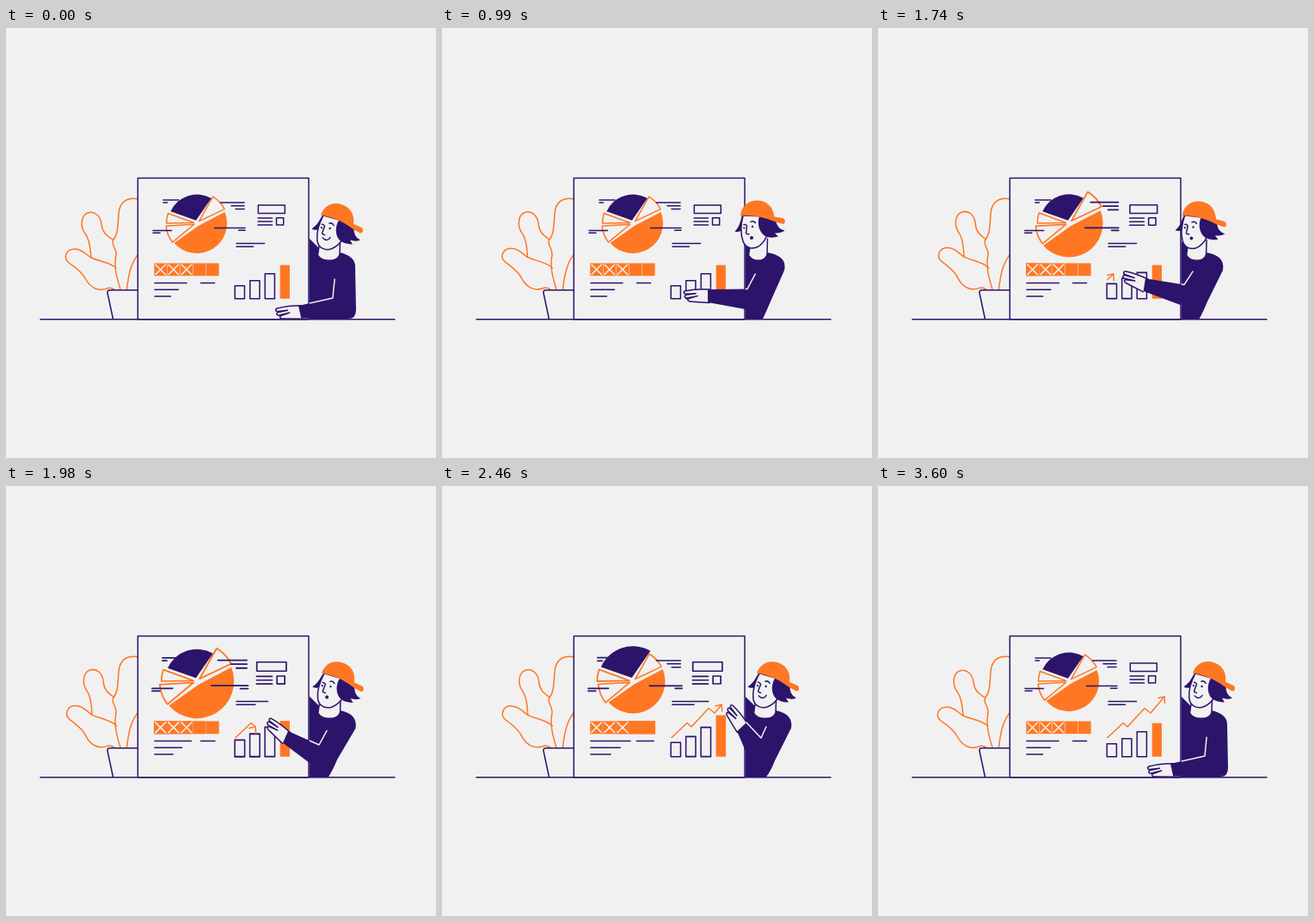
An HTML page for the animation above (3630 ms loop, 500 by 500 pixels).

```html
<!DOCTYPE html>
<html lang="en">
<head>
<meta charset="utf-8">
<title>Presentation board</title>
<style>
  html, body { margin: 0; height: 100%; overflow: hidden; background: #f1f1f1; }
  svg { display: block; width: 100%; height: 100%; stroke-linecap: round; stroke-linejoin: round; }
  .ink { fill: #2c146b; }
  .pop { fill: #ff7723; }
  .line { fill: none; stroke: #2c146b; stroke-width: 1.5; }
  .warm { fill: none; stroke: #ff7723; stroke-width: 1.5; }
  .light { fill: none; stroke: #f1f1f1; stroke-width: 1.5; }
  .skin { fill: #f1f1f1; stroke: #2c146b; stroke-width: 1.5; }
</style>
</head>
<body>
<svg viewBox="0 0 500 500">
  <clipPath id="side"><path d="M352.8 150H500V345H352.8Z"/></clipPath>

  <g class="warm">
    <g id="leaves">
      <path d="M99 267C98 256 97 246 92 239C86 231 87 218 95 215C103 212 110 219 111 228C112 238 117 241 124 246"/>
      <path d="M128 279C121 272 107 271 99 267C92 263 89 257 80 257C70 257 66 267 73 273C81 279 88 283 92 291C99 304 109 306 117 303Q121 301 126 304"/>
    </g>
    <path d="M154 199C141 196 132 202 131 216C130 231 130 240 125 246C121 251 129 256 128 264C125 277 129 291 133 304"/>
    <path d="M154 263C145 272 142 289 140.5 304"/>
  </g>
  <path class="line" d="M153 304.7H121Q117.5 304.7 118 308L124.500 338.500"/>

  <g clip-path="url(#side)">
    <path id="body" class="ink"/>
    <path id="neck" class="skin"/>
  </g>

  <path class="skin" d="M153.3 174.5H352V338.7H153.3Z"/>
  <g id="board"></g>
  <path id="graph" class="warm"/>
  <path id="tip" class="warm" d="M-7 1.5L0 0L.5 7.5"/>
  <path class="line" d="M40 338.7H452"/>

  <g id="head">
    <path class="ink" d="M349 217C347 225 346 231 340.5 236.5Q345 238 349 235Z"/>
    <path class="skin" d="M350 218C347 230 347.5 241 350 248C353 256 361 258 368 254Q374 250 377 243L378 219Z"/>
    <path class="ink" d="M369 219C366 228 369 238 376 242Q382 245 391 242.5L387 238.5Q394 239 398.5 235.5Q390 234 388 224Z"/>
    <path class="pop" d="M347 218.5C348 207 356 200.5 367 200.5C378 201 385 208 386.5 219.5L396 221C400 222 400 228 396 227.7Q388 226 380 222.5C369 218.5 358 218 347 218.5Z"/>
    <path class="line" d="M351 228.7Q353 228 354.5 230Q354 235 353.5 238.5Q354 240 357 239.7M359 225.5Q362 223.5 364.5 226.5"/>
    <circle class="ink" cx="361" cy="231" r="1.2"/>
    <circle class="ink" cx="351.3" cy="232.5" r="1.1"/>
    <circle id="gasp" class="ink" cx="360" cy="244" r="2"/>
    <path id="smile" class="line" d="M355.5 243.7Q362 247.5 364 241"/>
  </g>

  <path id="hand" class="skin" d="M2 -7.5C-6 -8 -16 -8 -26 -6C-29 -5 -28 -2 -25 -2.5L-14 -3L-25 -1.5C-29 0 -26 3 -23 2L-12 0L-22 2.8C-25 4 -23 6.5 -19 6.5L2 8"/>
  <path id="arm" class="ink"/>
  <path id="seam" class="light" clip-path="url(#side)"/>
</svg>

<script>
const LOOP = 3630;
const RAD = Math.PI / 180;
const $ = id => document.getElementById(id);
const set = (el, attrs) => { for (const k in attrs) el.setAttribute(k, attrs[k]); };
const show = (id, on) => set($(id), { visibility: on ? 'visible' : 'hidden' });
const mix = (a, b, p) => a + (b - a) * p;
const clamp = p => Math.min(1, Math.max(0, p));
const ease = p => (1 - Math.cos(Math.PI * p)) / 2;
const polar = ([x, y], r, deg) => [x + r * Math.cos(deg * RAD), y + r * Math.sin(deg * RAD)];

// keys: [time, values]
function pose(keys, t) {
  const i = keys.findIndex(([time]) => time > t);
  if (i < 0) return keys[keys.length - 1][1];
  const [t0, a] = keys[i - 1], [t1, b] = keys[i];
  const p = ease((t - t0) / (t1 - t0));
  return a.map((v, k) => mix(v, b[k], p));
}

// One swell around its peak time, 0 to 1
function swell(t, peak) {
  const d = (t - peak) / 650;
  return Math.abs(d) < 1 ? Math.cos(d * Math.PI / 2) ** 2 : 0;
}

// Board contents: every item swells about its own origin
const items = [];
function add(cls, d, origin, grow, peak) {
  const el = document.createElementNS('http://www.w3.org/2000/svg', 'path');
  set(el, { class: cls, d });
  $('board').append(el);
  items.push({ el, origin, grow, peak });
}
const rect = (x, y, w, h) => `M${x} ${y}h${w}v${h}h${-w}Z`;

// Pie, clockwise: start angle, end angle, radius
const hub = [222, 227];
[['warm', -59, -27, 36], ['pop', -22, 139, 35], ['warm', 142, 175, 36],
  ['warm', 180, 199, 35.5], ['ink', 204, 300, 33.5]].forEach(([cls, from, to, r], i) => {
  const apex = polar(hub, 3.5, (from + to) / 2);
  add(cls, `M${apex}L${polar(hub, r, from)}A${r} ${r} 0 0 1 ${polar(hub, r, to)}Z`, hub, [.24, .24], 1960 + 90 * i);
});

// Lines of text: side is 0 for left aligned, 1 for right aligned
function text(x, y, pitch, widths, side, peak, grow, centre) {
  const d = widths.map((w, i) => `M${x - side * w} ${y + i * pitch}h${w}`).join('');
  const half = centre ? (.5 - side) * widths[0] : 0;
  add('line', d, [x + half, y + pitch / 2], [grow, centre ? grow : 0], peak);
}
text(277, 203, 3.75, [27.5, 15, 10], 1, 1960, .22, true);
text(278, 232.5, 2.8, [35.5, 7.5], 1, 2060, .2, true);
text(171, 235.5, 2.8, [21.5, 8], 0, 2200, .15, true);
text(183, 200, 3, [18, 4.5], 0, 2320, .25, true);
text(268, 250.5, 3.8, [32.5, 19.5], 0, 2350, .3);
text(173, 296.5, 7.7, [37, 27.5, 18.5], 0, 2300, .28);
text(226.5, 296.5, 0, [16], 0, 2480, .22);

const card = [309, 218];
add('line', rect(293.3, 206, 31, 9.5) + rect(314.5, 220.7, 8.2, 8.2)
  + [221, 225, 229].map(y => `M293 ${y}h16.5`).join(''), card, [.15, .15], 2220);

for (let i = 0; i < 5; i++) {
  const x = 172.3 + i * 15.15, swellBy = [[x + 7.3, 281], [.06, .06], 2000 + i * 120];
  add('pop', rect(x, 273.5, 14.7, 14.7), ...swellBy);
  if (i < 3) add('light', `M${x + 1.7} 275.2l11.300 11.300m0 -11.300l-11.300 11.300`, ...swellBy);
}
for (let i = 0; i < 4; i++) {
  const x = 266.2 + 17.5 * i;
  add(i < 3 ? 'line' : 'pop', rect(x, 314.7, 11.2, -(15 + 5 * i + i * i)),
    [x + 5.6, 314.7], [.03, .3 - .02 * i], 2060 + 38 * i * i);
}

const trend = [[267, 292.5], [285, 275.5], [290, 280], [310, 258.5], [317, 264], [333, 245]];
const gaps = trend.slice(1).map(([x, y], i) => Math.hypot(x - trend[i][0], y - trend[i][1]));
const total = gaps.reduce((a, b) => a + b);

function drawTrend(p) {
  show('graph', p > 0);
  show('tip', p > 0);
  let left = p * total, end = trend[0], d = 'M' + end;
  for (let i = 0; i < gaps.length && left > 0; i++) {
    const q = Math.min(1, left / gaps[i]);
    end = trend[i].map((v, k) => mix(v, trend[i + 1][k], q));
    d += 'L' + end;
    left -= gaps[i];
  }
  set($('graph'), { d });
  set($('tip'), { transform: `translate(${end})` });
}

// Lean towards the board and tuck of the hem
const stand = [[0, [0, 0]], [380, [0, 0]], [960, [1, 1]], [1590, [1, 1]], [1970, [-.05, 1]],
  [2170, [-.2, 1]], [2480, [0, .9]], [2980, [0, 0]]];
// Cuff, elbow and wrist bend
const rest = [340, 323, 380, 314, 9], low = [298, 296, 350, 296.5, 12], high = [354, 275, 371, 293, 8];
const reach = [[0, rest], [300, rest], [980, [309, 304, 355, 303.5, 0]], [1460, low], [1540, low],
  [1980, [328, 285, 364, 301, 16]], [2450, high], [2520, high], [2980, rest]];

function drawTorso(lean, tuck) {
  const l = 363 - 6 * lean, r = 388 - 10 * lean, top = 245 + 5 * lean;
  const hem = 407 - 22 * tuck - 3 * lean;
  set($('body'), { d: `M345 ${top - 4}L353 ${top}L${l} 255L${r} 261Q${405 + 4 * tuck - 7 * lean} 265 ${406 - 8 * lean} ${276 + 6 * tuck}`
    + `L${hem} ${328 - 10 * tuck}Q${hem - 5 * tuck} ${338 - 8 * tuck} ${398 - 23 * tuck - 2 * lean} 338H345Z` });
  set($('neck'), { d: `M${l + 1} 254L${l - .5} 264C${l + 4} 272 ${r - 3} 273 ${r} 263.5L${r + .5} ${249 - 4 * lean}` });
  const up = 1 - lean;
  set($('head'), { transform: `translate(${9.6 * up} ${3 * up})rotate(${14 * up} 368 255)` });
}

function drawArm([cx, cy, ex, ey, bend], lean) {
  const angle = Math.atan2(ey - cy, ex - cx) / RAD;
  const cuff = [cx, cy], elbow = [ex, ey];
  const below = (p, width) => polar(p, width, angle + 90);
  set($('arm'), { d: `M${cuff}L${elbow}L${below(elbow, 24)}L${below(cuff, 15)}Z` });
  const sleeve = [mix(ex, 385 - 8 * lean, .42), mix(ey, 262, .42)];
  set($('seam'), { d: `M${sleeve}L${elbow}L${cuff}` });
  set($('hand'), { transform: `translate(${below(cuff, 7.5)})rotate(${angle + bend})` });
}

function draw(t) {
  const sway = .85 * (1 - Math.cos(2 * Math.PI * (t - 60) / LOOP));
  set($('leaves'), { transform: `rotate(${sway} 130 303)` });
  for (const { el, origin: [x, y], grow, peak } of items) {
    const scale = grow.map(g => 1 + g * swell(t, peak));
    set(el, { transform: `translate(${x} ${y})scale(${scale})translate(${-x} ${-y})` });
  }
  drawTrend(ease(clamp((t - 1480) / 1280)));

  const [lean, tuck] = pose(stand, t);
  drawTorso(lean, tuck);
  drawArm(pose(reach, t), lean);
  const amazed = t > 620 && t < 2200;
  show('gasp', amazed);
  show('smile', !amazed);
}

const begin = performance.now();
function tick() {
  draw((performance.now() - begin) % LOOP);
  requestAnimationFrame(tick);
}
tick();
</script>
</body>
</html>
```
